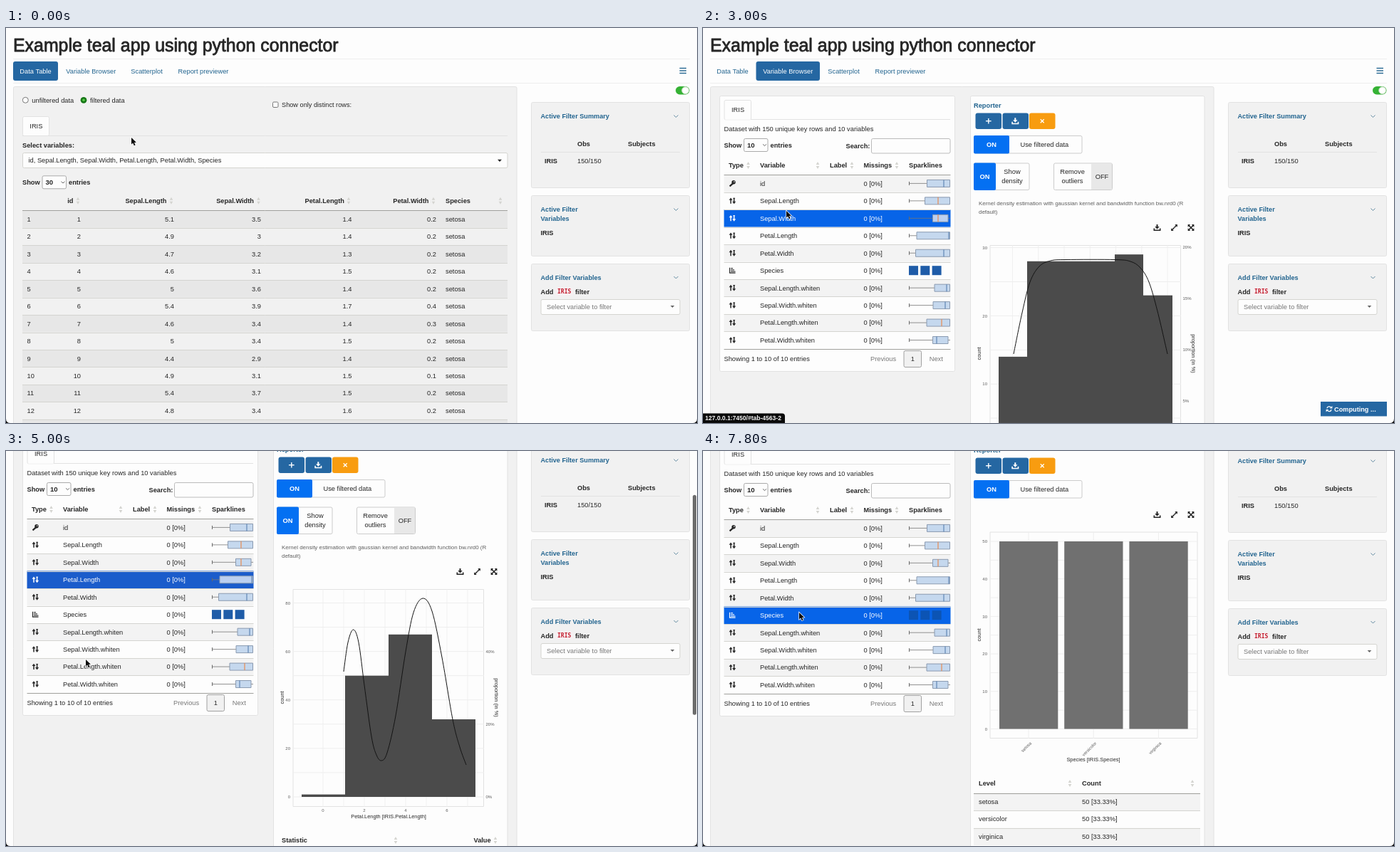
Recreate the animation shown at these times as an HTML page with a canvas. Size 970x555 px, loop 8000 ms.

```html
<!DOCTYPE html>
<html lang="en">
<head>
<meta charset="utf-8">
<title>Example teal app using python connector</title>
<style>
html, body { margin: 0; width: 100%; height: 100%; overflow: hidden; background: #fdfdfd; }
canvas { display: block; width: 970px; height: 555px; }
</style>
</head>
<body>
<canvas id="stage" width="970" height="555"></canvas>
<script>
const ctx = document.getElementById('stage').getContext('2d');
const LOOP = 8000, STEP = 200;
const SANS = '"Liberation Sans", Arial, sans-serif';
const MONO = '"DejaVu Sans Mono", monospace';
const C = {
  page: '#fdfdfd', panel: '#f1f1f1', stripe: '#e7e7e7', soft: '#f3f3f3', edge: '#e2e2e2',
  grid: '#eeeeee', line: '#d4d4d0', dark: '#a0a09c', ink: '#262626', mute: '#777777',
  blue: '#2567a2', link: '#22648f', on: '#0470f2', orange: '#f89c10', bar: '#4b4b4b'
};

// ---- helpers ----
function text(s, x, y, o = {}) {
  const size = o.size || 9.3;
  ctx.font = (o.bold ? 'bold ' : '') + size + 'px ' + (o.font || SANS);
  ctx.textAlign = o.align || 'left';
  ctx.fillStyle = o.color || C.ink;
  ctx.fillText(s, x, y + size * 0.36);
}
const bold = (s, x, y, o = {}) => text(s, x, y, { bold: true, size: 9.25, ...o });

function turned(s, x, y, angle, o) {
  ctx.save();
  ctx.translate(x, y);
  ctx.rotate(angle);
  text(s, 0, 0, { align: 'center', ...o });
  ctx.restore();
}
function box(x1, y1, x2, y2, fill, edge, r = 0) {
  ctx.beginPath();
  const h = edge ? 0.5 : 0;
  ctx.roundRect(x1 + h, y1 + h, x2 - x1 - 2 * h, y2 - y1 - 2 * h, r);
  if (fill) { ctx.fillStyle = fill; ctx.fill(); }
  if (edge) { ctx.strokeStyle = edge; ctx.lineWidth = 1; ctx.stroke(); }
}
function path(pts, color, width = 1, close) {
  ctx.beginPath();
  pts.forEach(([x, y], i) => i ? ctx.lineTo(x, y) : ctx.moveTo(x, y));
  if (close) { ctx.closePath(); ctx.fillStyle = color; ctx.fill(); return; }
  ctx.strokeStyle = color;
  ctx.lineWidth = width;
  ctx.stroke();
}
const rule = (x1, x2, y, color) => path([[x1, y], [x2, y]], color);
function disc(x, y, r, fill, edge) {
  ctx.beginPath();
  ctx.arc(x, y, r, 0, 7);
  ctx.fillStyle = fill;
  ctx.fill();
  if (edge) { ctx.strokeStyle = edge; ctx.lineWidth = 1; ctx.stroke(); }
}
const tri = (x, y, w, h, color) => path([[x - w, y], [x + w, y], [x, y + h]], color, 1, true);
const chevron = (x, y, r, color) => path([[x - r, y - r / 2], [x, y + r / 2], [x + r, y - r / 2]], color, 1);
function sorter(x, y) {
  tri(x, y - 1, 2.3, -4, '#d4d4d0');
  tri(x, y + 1, 2.3, 4, '#d4d4d0');
}
// Latest value of a list of [time, value] pairs
const at = (keys, t) => keys.reduce((v, k) => t >= k[0] ? k[1] : v, keys[0][1]);
function curve(pts) {
  ctx.beginPath();
  ctx.moveTo(...pts[0]);
  const n = pts.length - 1;
  for (let i = 0; i < n; i++) {
    const a = pts[Math.max(i - 1, 0)], b = pts[i], c = pts[i + 1], d = pts[Math.min(i + 2, n)];
    ctx.bezierCurveTo(b[0] + (c[0] - a[0]) / 6, b[1] + (c[1] - a[1]) / 6,
      c[0] - (d[0] - b[0]) / 6, c[1] - (d[1] - b[1]) / 6, c[0], c[1]);
  }
  ctx.strokeStyle = '#141414';
  ctx.lineWidth = 1;
  ctx.stroke();
}

// ---- icons ----
function downloadIcon(x, y, color) {
  path([[x, y - 4.5], [x, y]], color, 2);
  tri(x, y - 1.5, 3.2, 3.6, color);
  path([[x - 4.2, y + 1], [x - 4.2, y + 3.8], [x + 4.2, y + 3.8], [x + 4.2, y + 1]], color, 1.6);
}
function cornerArrow(x, y, dx, dy) {
  path([[x, y], [x + dx * 3.4, y + dy * 3.4]], C.ink, 1.5);
  path([[x + dx * 4.4, y + dy * 4.4], [x + dx * 4.4, y + dy * 0.8], [x + dx * 0.8, y + dy * 4.4]], C.ink, 1, true);
}
function toolIcons(y) {
  downloadIcon(637.5, y, C.ink);
  cornerArrow(661.5, y, 1, -1);
  cornerArrow(661.5, y, -1, 1);
  for (const dx of [-1, 1]) for (const dy of [-1, 1]) cornerArrow(685, y, dx, dy);
}
function typeIcon(row, y, color) {
  if (row === 0) {
    disc(43, y - 1.6, 2.7, color);
    disc(43.7, y - 2.3, 0.8, C.soft);
    path([[42, y], [37.5, y + 4]], color, 2.2);
  } else if (row === 5) {
    path([[37.5, y - 4], [37.5, y + 3.5], [45.5, y + 3.5]], color, 1.2);
    [[-3, 3], [-0.8, 5], [1.4, 6.5]].forEach(([d, w]) => path([[39, y + d], [39 + w, y + d]], color, 1.1));
  } else {
    path([[39, y + 4], [39, y - 2]], color, 1.5);
    tri(39, y - 1, 2.5, -3.4, color);
    path([[43.6, y - 4], [43.6, y + 2]], color, 1.5);
    tri(43.6, y + 1, 2.5, 3.4, color);
    path([[42.2, y - 3.6], [45, y - 3.6]], color, 1);
  }
}

// ---- page frame ----
function header(tab, hover) {
  const title = 'Example teal app using python connector';
  text(title, 10, 24, { size: 24.9 });
  ctx.lineJoin = 'round';
  ctx.strokeStyle = C.ink;
  ctx.lineWidth = 0.8;
  ctx.strokeText(title, 10, 24 + 24.9 * 0.36);
  ctx.lineJoin = 'miter';
  rule(10, 960, 43.5, C.grid);
  rule(10, 960, 77.5, C.grid);
  const tabs = [['Data Table', 10, 73], ['Variable Browser', 74.5, 164], ['Scatterplot', 165, 230], ['Report previewer', 232, 322]];
  tabs.forEach(([name, x1, x2], i) => {
    if (i === tab) box(x1, 47, x2, 74, C.blue, null, 3);
    else if (i === 1 && hover) box(x1, 47, x2, 74, C.stripe, null, 3);
    text(name, (x1 + x2) / 2, 60.5, { align: 'center', color: i === tab ? '#fff' : C.link });
  });
  for (const y of [56.5, 60, 63.5]) path([[945.5, y], [955, y]], C.link, 1.4);
  box(940, 82, 959.5, 93.5, '#35b234', null, 6);
  disc(953.7, 87.7, 5, '#fff', '#b4d8b0');
}
function filters() {
  [[104, 225], [235, 321], [331, 426]].forEach(([a, b]) => box(737, a, 960, b, C.panel, C.edge, 2));
  const head = (s, y) => bold(s, 750.5, y, { color: C.link, size: 9.15 });
  head('Active Filter Summary', 124);
  head('Active Filter', 255);
  head('Variables', 268);
  head('Add Filter Variables', 350.5);
  for (const y of [124, 255, 350.5]) chevron(940.5, y, 3, '#5f88a0');
  bold('Obs', 802, 162.5);
  bold('Subjects', 873, 162.5);
  rule(751, 946, 174.5, C.edge);
  bold('IRIS', 756, 186.5);
  text('150/150', 802, 186.5);
  bold('IRIS', 750.5, 288);
  bold('Add', 750.5, 370.5);
  box(771, 365, 796, 376, '#f6f0f2', null, 2);
  bold('IRIS', 774, 370.5, { font: MONO, size: 8, color: '#c41f2f' });
  bold('filter', 799, 370.5);
  box(750.5, 381, 946.5, 403, C.page, C.line, 2);
  text('Select variable to filter', 759, 391.5, { color: C.mute });
  tri(935.5, 390, 2.8, 3, '#666');
}
function pageSize(x, y, n) {
  bold('Show', x, y);
  box(x + 27.5, y - 9.5, x + 62, y + 9.5, C.page, '#aaa', 2);
  bold(n, x + 32.5, y, { size: 9.6 });
  chevron(x + 57, y, 2.4, '#666');
  bold('entries', x + 65, y);
}

// ---- data table ----
const iris = `5.1 3.5 1.4 0.2|4.9 3 1.4 0.2|4.7 3.2 1.3 0.2|4.6 3.1 1.5 0.2|5 3.6 1.4 0.2|5.4 3.9 1.7 0.4|4.6 3.4 1.4 0.3|5 3.4 1.5 0.2|4.4 2.9 1.4 0.2|4.9 3.1 1.5 0.1|5.4 3.7 1.5 0.2|4.8 3.4 1.6 0.2|4.8 3 1.4 0.1`
  .split('|').map(r => r.split(' '));
const ROW = 24.46;

function dataTable() {
  disc(27.3, 101.3, 4, C.page, '#777');
  text('unfiltered data', 36.3, 101.3);
  disc(109, 101.3, 4.4, '#187818');
  disc(109, 101.3, 1.7, '#5cd04a');
  text('filtered data', 118, 101.3);
  box(374, 103.5, 382.5, 112, C.page, '#777', 1.5);
  text('Show only distinct rows:', 387, 107.5, { size: 9.2 });
  rule(23, 704, 151.5, C.edge);
  box(23, 124, 61, 152, C.page, C.edge, 2);
  text('IRIS', 33.3, 138);
  bold('Select variables:', 23, 165);
  box(23, 175, 704.5, 197, C.page, C.line, 2);
  text('id, Sepal.Length, Sepal.Width, Petal.Length, Petal.Width, Species', 31.5, 186);
  tri(693, 184.7, 3, 3.2, C.ink);
  pageSize(23, 216.8, '30');

  [['id', 94.5, 101], ['Sepal.Length', 225.5, 232], ['Sepal.Width', 348, 354.5], ['Petal.Length', 475, 481], ['Petal.Width', 593.5, 600]]
    .forEach(([name, x, icon]) => { bold(name, x, 242.8, { align: 'right' }); sorter(icon, 242.8); });
  bold('Species', 617, 242.8);
  sorter(694, 242.8);
  const ends = [236, 358, 485.5, 604];
  iris.forEach((vals, i) => {
    const top = 256.3 + i * ROW, y = top + 12.2;
    if (i % 2 === 0) box(23, top, 704, top + ROW, C.stripe);
    rule(23, 704, Math.round(top) + 0.5, i ? C.line : C.dark);
    text(String(i + 1), 29.5, y);
    text(String(i + 1), 105, y, { align: 'right' });
    vals.forEach((v, k) => text(v, ends[k], y, { align: 'right' }));
    text('setosa', 617, y);
  });
}

// ---- variable browser ----
// name, box start, box end, median, median is orange
const vars = [
  ['id', 314, 347, 338], ['Sepal.Length', 311, 347, 330, 1], ['Sepal.Width', 322, 344.5, 330, 1],
  ['Petal.Length', 299.5, 347, 345], ['Petal.Width', 298, 347, 338], ['Species'],
  ['Sepal.Length.whiten', 324.5, 347, 342], ['Sepal.Width.whiten', 322.5, 347, 340],
  ['Petal.Length.whiten', 313.5, 347, 335, 1], ['Petal.Width.whiten', 322, 344.5, 328]
];
function sparkline([, a, b, med, warm], y, sel) {
  if (!a) {
    for (const x of [289, 305.3, 321.6]) box(x, y - 6.5, x + 13, y + 6.5, sel ? '#0c54b4' : '#1f5ca8');
    return;
  }
  path([[289.5, y - 2.5], [289.5, y + 2.5]], '#666');
  path([[289.5, y], [347, y]], '#777', 0.8);
  box(a, y - 5.5, b, y + 5.5, sel ? '#bcd0f0' : '#c5d8ee', '#8a9ab0');
  path([[med, y - 5], [med, y + 5]], warm ? '#e88a50' : '#5f86b4', 1.2);
}
function browser(sel, hover) {
  box(23, 95, 354, 483, C.page, C.edge, 2);
  rule(30, 347, 128.5, C.edge);
  box(29.5, 101, 68, 129.5, C.page, C.edge, 2);
  rule(30.5, 67, 129, C.page);
  text('IRIS', 40, 115);
  text('Dataset with 150 unique key rows and 10 variables', 29.5, 142);
  pageSize(29.5, 164.5, '10');
  bold('Search:', 200.5, 165.5);
  box(236, 155, 347.5, 176.5, C.page, '#bbb', 2);
  [['Type', 36, 63.5], ['Variable', 80, 161], ['Label', 178, 209], ['Missings', 225.5, 272], ['Sparklines', 289]]
    .forEach(([name, x, icon]) => { bold(name, x, 193); if (icon) sorter(icon, 193); });
  vars.forEach((v, i) => {
    const top = 206.2 + i * ROW, y = top + 12.2, on = i === sel;
    if (on) box(29.5, top, 347.5, top + ROW, hover ? '#0764e8' : '#1b5ccb');
    else if (i % 2 === 0) box(29.5, top, 347.5, top + ROW, C.soft);
    rule(29.5, 347.5, Math.round(top) + 0.5, i ? C.line : C.dark);
    const color = on ? '#fff' : C.ink;
    typeIcon(i, y, color);
    text(v[0], 80, y, { color });
    text('0 [0%]', 225.5, y, { color });
    sparkline(v, y, on);
  });
  rule(29.5, 347.5, 451.5, C.dark);
  text('Showing 1 to 10 of 10 entries', 29.5, 464.8);
  text('Previous', 235, 465, { color: C.mute });
  box(281.5, 453, 307, 477, C.panel, '#a0a0a0', 2);
  text('1', 294.3, 465, { align: 'center' });
  text('Next', 317.7, 465, { color: C.mute });
}

// ---- charts ----
const charts = {
  id: { dy: 0, left: 403, y0: 596, unit: 9.58, ys: [0, 10, 20, 30], pct: 14.4, ps: [0, 5, 10, 15, 20],
    xs: [[0, 434.5], [50, 507], [100, 579.5], [150, 652]], x1: 414.5, counts: [14, 28, 28, 28, 29, 23], label: 'id [IRIS.id]',
    pts: [[436, 458], [448, 400], [459, 357], [472, 335], [488, 327], [510, 325.5], [578, 325.5], [600, 328], [614, 337], [626, 357], [638, 398], [652, 458]] },
  width: { dy: 23, factor: true, left: 406, y0: 619.5, unit: 1.627, ys: [0, 50, 100, 150], pct: 2.44, ps: [0, 30, 60, 90],
    xs: [[2, 447], [3, 522], [4, 597]], x1: 417.5, counts: [24, 114, 12], label: 'Sepal.Width [IRIS.Sepal.Width]',
    pts: [[447, 608], [462, 578], [480, 536], [494, 480], [503, 428], [513, 354], [522, 341], [531, 355], [541, 422], [553, 478], [566, 532], [583, 556], [597, 590], [608, 604], [627, 612]] },
  length: { dy: 0, left: 403, y0: 597, unit: 3.406, ys: [0, 20, 40, 60, 80], pct: 5.11, ps: [0, 20, 40],
    xs: [[0, 445], [2, 503], [4, 561], [6, 619]], x1: 414.5, counts: [1, 50, 67, 32], label: 'Petal.Length [IRIS.Petal.Length]',
    pts: [[474, 421], [480, 380], [487.5, 362], [495, 380], [503, 440], [513, 512], [520, 538], [527, 546], [535, 535], [547, 483], [561, 393], [572, 338], [585, 318], [598, 336], [612, 401], [627, 488], [637, 527], [646, 552]] },
  petal: { dy: 23, factor: true, left: 403, y0: 619.5, unit: 4.3, ys: [0, 20, 40, 60], pct: 6.45, ps: [0, 10, 20, 30, 40],
    xs: [[0, 445], [1, 521], [2, 597]], x1: 414.5, counts: [48, 17, 56, 29], label: 'Petal.Width [IRIS.Petal.Width]',
    pts: [[452, 430], [463, 345], [475, 430], [493, 575], [505, 580], [525, 485], [545, 440], [565, 480], [585, 500], [600, 495], [620, 560], [634, 595]] }
};
const tick = { size: 6, color: '#5c5c5c' };
const name7 = { size: 7.4 };

function toggle(x1, x2, y1, y2, split, on) {
  box(x1, y1, x2, y2, C.page, '#ccc', 2);
  if (on) box(x1, y1, split, y2, C.on, null, 2);
  else box(split, y1 + 1, x2 - 1, y2 - 1, '#e8e8e8');
  const mid = on ? (x1 + split) / 2 : (split + x2) / 2;
  text(on ? 'ON' : 'OFF', mid, (y1 + y2) / 2, { align: 'center', bold: on, color: on ? '#fff' : C.ink });
}
function reporter() {
  box(375, 95, 704.5, 1000, C.page, C.edge, 2);
  bold('Reporter', 380, 109, { color: C.link });
  [[382.5, C.blue], [420.5, C.blue], [458, C.orange]].forEach(([x, fill]) => box(x, 119.5, x + 36.5, 142, fill, null, 3));
  path([[397, 130.7], [404.6, 130.7]], '#fff', 1.4);
  path([[400.8, 127], [400.8, 134.5]], '#fff', 1.4);
  downloadIcon(438.3, 130.7, '#fff');
  path([[473.7, 128.2], [478.7, 133.2]], '#fff', 1.3);
  path([[478.7, 128.2], [473.7, 133.2]], '#fff', 1.3);
  toggle(380, 532.5, 151, 176.5, 430, true);
  text('Use filtered data', 445.5, 163.5);
}
function histogram(g) {
  const { dy, left, y0 } = g, top = 305 + dy, end = top + 306, w = (659 - g.x1) / g.counts.length;
  if (g.factor) {
    box(380.5, 191.5, 389, 200, C.page, '#777', 1.5);
    text('Treat variable as factor', 393, 195.7);
  }
  const mid = { align: 'center' };
  toggle(380, 458.5, 189.5 + dy, 228 + dy, 411, true);
  text('Show', 434, 202 + dy, mid);
  text('density', 434, 215 + dy, mid);
  toggle(492, 575, 189.5 + dy, 228 + dy, 545, false);
  text('Remove', 518.5, 202 + dy, mid);
  text('outliers', 518.5, 215 + dy, mid);
  const note = { size: 7.95, color: '#5e5e5e' };
  text('Kernel density estimation with gaussian kernel and bandwidth function bw.nrd0 (R', 387, 246.5 + dy, note);
  text('default)', 387, 257.8 + dy, note);
  toolIcons(280.5 + dy);

  box(left - 0.5, top, 671, end, null, C.edge);
  const dx = g.xs[1][1] - g.xs[0][1];
  g.xs.forEach(([s, x]) => {
    for (const gx of [x, x + dx / 2]) if (gx < 670) path([[gx, top], [gx, end]], C.grid, 0.8);
    text(String(s), x, end + 4.5, { ...tick, align: 'center' });
  });
  g.ys.forEach((v, i) => {
    const y = y0 - v * g.unit;
    rule(left, 671, y, C.grid);
    if (i) rule(left, 671, y + g.ys[1] * g.unit / 2, C.grid);
    text(String(v), left - 4, y, { ...tick, align: 'right' });
  });
  g.ps.forEach(p => text(p + '%', 673.5, y0 - p * g.pct, tick));
  ctx.fillStyle = C.bar;
  g.counts.forEach((n, i) => {
    const x = Math.round(g.x1 + i * w);
    ctx.fillRect(x, y0 - n * g.unit, Math.round(g.x1 + (i + 1) * w) - x, n * g.unit);
  });
  curve(g.pts);
  turned('count', 387, 457.5 + dy, -Math.PI / 2, name7);
  turned('proportion (in %)', 689, 457.5 + dy, Math.PI / 2, name7);
  text(g.label, (left + 671) / 2, end + 13, { ...name7, align: 'center' });
  bold('Statistic', 387, 658 + dy);
  bold('Value', 656.5, 658 + dy);
  sorter(547, 658 + dy);
  sorter(687, 658 + dy);
}
function species() {
  toolIcons(199.5);
  box(402.5, 223.5, 694.5, 514, null, C.edge);
  for (let v = 0; v <= 50; v += 5) {
    const y = 500.5 - v * 5.27;
    rule(403, 694, y, C.grid);
    if (v % 10 === 0) text(String(v), 399, y, { ...tick, align: 'right' });
  }
  ['setosa', 'versicolor', 'virginica'].forEach((s, i) => {
    const x = 416 + i * 91.2, y = 602.5 + i * 24.5;
    path([[x + 41, 224], [x + 41, 514]], C.grid);
    box(x, 237, x + 82.3, 500.5, '#707070');
    ctx.save();
    ctx.translate(x + 44, 519.5);
    ctx.rotate(-Math.PI / 4);
    text(s, 0, 0, { ...tick, align: 'right' });
    ctx.restore();
    if (i % 2 === 0) box(380, y - 12, 698, y + 12.4, C.soft);
    rule(380, 698, Math.round(y - 12) + 0.5, i ? C.line : C.dark);
    text(s, 387, y);
    text('50 [33.33%]', 532, y);
  });
  turned('count', 387, 368.5, -Math.PI / 2, name7);
  text('Species [IRIS.Species]', 548, 543, { ...name7, align: 'center' });
  bold('Level', 387, 577);
  bold('Count', 532, 577);
  sorter(515, 577);
  sorter(687, 577);
}

// ---- overlays ----
function computing() {
  box(867, 525, 960, 545.5, C.blue);
  ctx.strokeStyle = '#fff';
  ctx.lineWidth = 1.3;
  for (const a of [0.3, 0.3 + Math.PI]) {
    ctx.beginPath();
    ctx.arc(879, 535.3, 3.3, a, a + 2.3);
    ctx.stroke();
  }
  path([[883.4, 531], [883.4, 534.6], [879.8, 534.6]], '#fff', 1, true);
  path([[874.6, 539.6], [874.6, 536], [878.2, 536]], '#fff', 1, true);
  bold('Computing ...', 886, 535.3, { color: '#fff', size: 9.2 });
}
function address() {
  box(-4, 541.5, 115, 560, '#0a0a0a', null, 4);
  bold('127.0.0.1:7450/#tab-4563-2', 3, 548.3, { color: '#f4f4f4', size: 8.55 });
}
function shape(pts, x, y, fill, edge) {
  ctx.beginPath();
  pts.forEach(([a, b]) => ctx.lineTo(x + a, y + b));
  ctx.closePath();
  ctx.lineWidth = 1.4;
  ctx.strokeStyle = edge;
  ctx.stroke();
  ctx.fillStyle = fill;
  ctx.fill();
}
const arrow = [[0, 0], [0, 9.5], [2.2, 7.6], [3.8, 11.2], [5.6, 10.4], [4, 6.9], [6.9, 6.7]];
const hand = [[0, 0], [1.6, 0], [1.7, 3.5], [6.6, 4.6], [6.5, 8.2], [5.5, 11], [0, 11], [-3.4, 6.6], [-2.6, 5.4], [-0.1, 7]];
function corners() {
  ctx.fillStyle = '#000';
  for (const [x, s] of [[0, 1], [970, -1]]) {
    ctx.beginPath();
    ctx.moveTo(x, 555);
    ctx.lineTo(x, 549);
    ctx.quadraticCurveTo(x, 555, x + s * 6, 555);
    ctx.fill();
  }
}

// ---- timeline ----
const selKeys = [[0, 0], [2800, 2], [3800, 3], [5600, 2], [6400, 4], [7200, 5]];
const chartKeys = [[0, ''], [2200, 'id'], [3400, 'width'], [4200, 'length'], [5800, 'width'], [6800, 'petal'], [7600, 'species']];
const busySpans = [[1800, 2200], [2800, 3400], [3800, 4200], [5600, 5800], [6400, 6800], [7200, 7600]];
const scrollKeys = [[0, 0], [4600, 45], [4800, 90], [5000, 111], [5800, 110]];
const mouseKeys = [[0, 176, 154], [400, 176, 154], [1200, 118, 66], [1800, 118, 66], [2600, 117, 257], [3000, 117, 257],
  [3600, 114, 288], [4000, 112, 293], [5000, 112, 293], [5600, 125, 154], [5800, 125, 154], [6400, 140, 208], [6800, 140, 208], [7200, 135, 227], [8000, 135, 227]];

function mouse(t) {
  const i = mouseKeys.findIndex(k => k[0] > t);
  const a = mouseKeys[i - 1], b = mouseKeys[i];
  const p = (t - a[0]) / (b[0] - a[0]), e = p * p * (3 - 2 * p);
  return [a[1] + (b[1] - a[1]) * e, a[2] + (b[2] - a[2]) * e];
}
function draw(t) {
  const browsing = t >= 1800, onTab = t >= 1200 && t < 1800;
  const scroll = at(scrollKeys, t), sel = at(selKeys, t), chart = at(chartKeys, t);
  const [mx, my] = mouse(t);
  ctx.fillStyle = C.page;
  ctx.fillRect(0, 0, 970, 555);
  ctx.save();
  ctx.translate(0, -scroll);
  header(browsing ? 1 : 0, onTab);
  box(10, 82, 717.5, 1010, C.panel, C.edge, 2);
  filters();
  if (browsing) {
    const top = 206.2 + sel * ROW - scroll;
    browser(sel, my >= top && my < top + ROW);
    reporter();
    if (chart === 'species') species();
    else if (chart) histogram(charts[chart]);
  } else dataTable();
  ctx.restore();
  if (t >= 4600 && t < 5600) {
    const y = scroll * 0.557;
    box(964, y, 969, y + 309, '#6c6c6c', null, 2.5);
  }
  if (busySpans.some(([a, b]) => t >= a && t < b)) computing();
  if (t >= 1400 && t < 3400) address();
  if (onTab) shape(hand, mx, my, '#fff', '#111');
  else shape(arrow, mx, my, '#0c0c0c', '#fff');
  corners();
}
function tickFrame() {
  const t = performance.now() % LOOP;
  draw(Math.floor(t / STEP) * STEP);
  requestAnimationFrame(tickFrame);
}
tickFrame();
</script>
</body>
</html>
```
